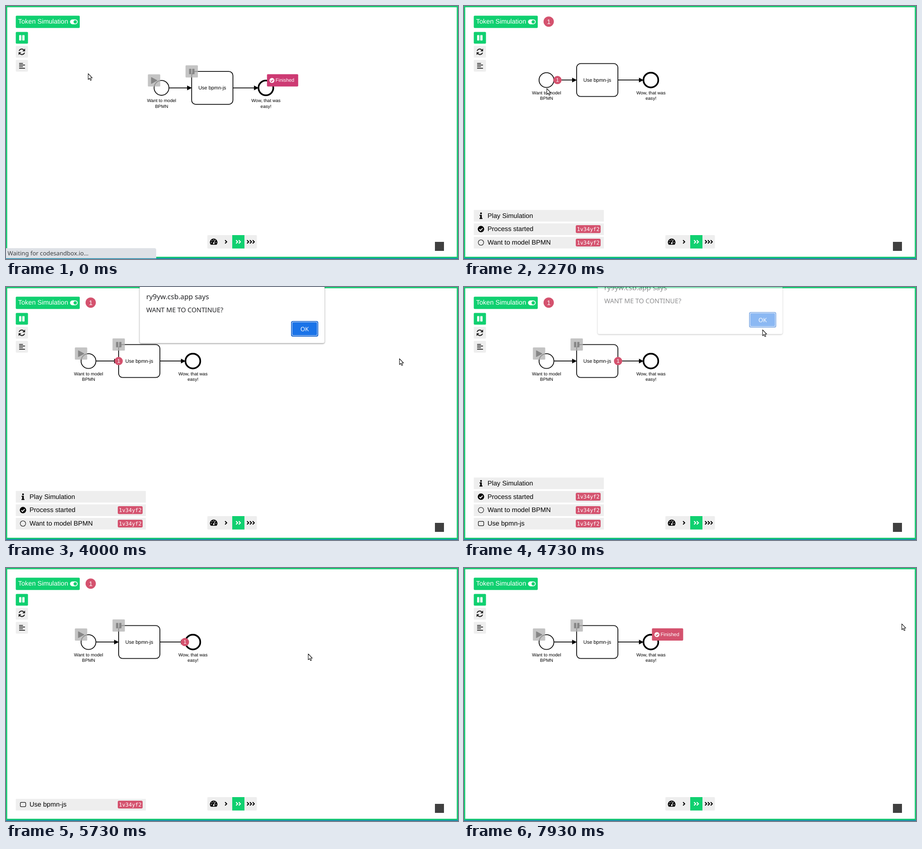
Recreate the animation shown at these times as an HTML page. Size 999x561 px, loop 9990 ms.

```html
<!DOCTYPE html>
<html lang="en">
<head>
<meta charset="utf-8">
<title>Token simulation</title>
<style>
  html, body { margin: 0; width: 100%; height: 100%; overflow: hidden; background: #fff; }
  svg { display: block; width: 999px; height: 561px; }
  text { font-family: "Liberation Sans", Arial, sans-serif; white-space: pre; text-rendering: geometricPrecision; }
  .ui { font-family: "Noto Sans", sans-serif; }
  .mono { font-family: "DejaVu Sans Mono", monospace; }
  .mid { text-anchor: middle; }
</style>
</head>
<body>
<svg id="stage" viewBox="0 0 999 561" xmlns="http://www.w3.org/2000/svg"></svg>
<script>
const LOOP = 9990, STEP = 1000 / 15;
const GREEN = '#10d070', GREY = '#eeeeee', INK = '#111', RED = '#d4526e';
const stage = document.getElementById('stage');

const rect = (x, y, w, h, fill, r = 0, more = '') =>
  `<rect x="${x}" y="${y}" width="${w}" height="${h}" rx="${r}" fill="${fill}" ${more}/>`;
const disc = (x, y, r, fill, more = '') =>
  `<circle cx="${x}" cy="${y}" r="${r}" fill="${fill}" ${more}/>`;
const path = (d, more) => `<path d="${d}" ${more}/>`;
const line = (d, color, w, more = '') =>
  path(d, `fill="none" stroke="${color}" stroke-width="${w}" ${more}`);
const text = (x, y, size, str, fill = '#000', cls = '') =>
  `<text x="${x}" y="${y}" font-size="${size}" fill="${fill}" class="${cls}">${str}</text>`;
const group = (id, body, more = '') => `<g id="${id}" ${more}>${body}</g>`;

const check = (x, y, r, fill, mark) => disc(x, y, r, fill) +
  line(`M${x - r * .5} ${y + r * .05}l${r * .36} ${r * .38}l${r * .66} ${-r * .72}`, mark, r * .3);
const pause = (x, y, fill) => rect(x - 6, y - 6, 5, 12, fill, 1) + rect(x + 1, y - 6, 5, 12, fill, 1);
const chevron = (x, color) => line(`M${x - 1.8} 519.2l3.6 3.7l-3.6 3.7`, color, 2.1);
const token = (id, r, size) =>
  group(id, disc(0, 0, r, RED) + text(0, size * .36, size, '1', '#fff', 'mid'));

function sync() {
  const half = line('M29 99.5A6.2 6.2 0 0 1 39.6 97.6', '#222', 2.1) +
    path('M42.2 94.3V100.4H36.1Z', 'fill="#222"');
  return half + `<g transform="rotate(180 35 101.5)">${half}</g>`;
}

function gauge() {
  const dots = [[-5.2, 1.6], [-3.8, -2.6], [0, -4.4], [5.2, 1.6]]
    .map(([x, y]) => disc(459 + x, 523 + y, 1, GREY)).join('');
  return path('M452.6 529A8.1 8.1 0 1 1 465.4 529Z',
    'fill="#000" stroke="#000" stroke-width=".6" stroke-linejoin="round"') + dots +
    line('M459.4 526L462.6 518.6', GREY, 1.3) + disc(459.2, 526, 1.9, GREY);
}

function panel() {
  return rect(21.6, 21.5, 141.4, 27.2, GREEN, 2) + text(26.8, 39.3, 14.5, 'Token Simulation', '#fff') +
    rect(141.5, 29.8, 17, 10.6, '#fff', 5.3) + disc(153, 35.1, 3.7, GREEN) +
    rect(21.6, 57.5, 27, 26, GREEN, 2) + pause(35, 70.5, '#fff') +
    rect(21.6, 88.5, 27, 26, GREY, 2) + sync() +
    rect(21.6, 119.5, 27, 26, GREY, 2) +
    line('M29 127.3h8.5M29 130.9h13M29 134.5h8.5M29 138.1h13', '#222', 1.7) +
    rect(445, 508, 109.5, 29.7, GREY, 2) + rect(500, 508, 27, 29.7, GREEN) + gauge() +
    chevron(486, '#000') + [510.3, 516.3].map(x => chevron(x, '#fff')).join('') +
    [534.6, 540.8, 547].map(x => chevron(x, '#000')).join('') +
    rect(948, 523, 20, 20, '#404040');
}

function diagram() {
  const label = (x, a, b) => text(x, 196, 10.04, a, '#000', 'mid') + text(x, 208.4, 10.04, b, '#000', 'mid');
  const flow = (a, b) => line(`M${a} 164.2H${b - 6}`, '#000', 1.83) +
    path(`M${b} 164.2l-9.6 -4.8v9.6Z`, 'fill="#000" stroke="#000" stroke-width=".6"');
  const pad = (x, y) => rect(x, y, 27.3, 27, 'rgba(180,180,180,.78)', 1.5);
  return disc(182.3, 164.2, 16.4, '#fff', `stroke="${INK}" stroke-width="1.83"`) +
    rect(248.9, 127.7, 91.25, 73, '#fff', 9.1, `stroke="${INK}" stroke-width="1.83"`) +
    disc(413, 164.2, 16.4, '#fff', 'stroke="#000" stroke-width="3.65"') +
    flow(199, 248.8) + flow(340.5, 396.5) +
    text(294.5, 167.8, 10.95, 'Use bpmn-js', '#000', 'mid') +
    label(182.5, 'Want to model', 'BPMN') + label(413.2, 'Wow, that was', 'easy!') +
    group('play', pad(152.2, 134) + path('M160 141.3L172.2 147.8L160 154.4Z',
      'fill="#868686" stroke="#868686" stroke-width="1.4" stroke-linejoin="round"')) +
    group('hold', pad(235.4, 114) + pause(249.2, 127.8, '#868686')) +
    group('done', rect(415.4, 133.8, 69, 27.2, 'currentColor', 2) +
      check(426.4, 147.7, 5.5, '#fff', 'currentColor') +
      text(434.4, 151.1, 10.95, 'Finished', '#fff'));
}

function dialog() {
  return path('M295.5 -140H704V120.5a4 4 0 0 1 -4 4H299.5a4 4 0 0 1 -4 -4Z',
      'fill="#fff" style="filter:drop-shadow(0 1px 1.6px rgba(0,0,0,.5))"') +
    text(310, 27.2, 15.5, 'ry9yw.csb.app says', '#202124', 'ui') +
    text(310, 56.3, 14.25, 'WANT ME TO CONTINUE?', '#202124', 'ui') +
    rect(630, 75.5, 60.2, 34.4, '#1a67cf', 4) + rect(631.8, 77.3, 56.6, 30.8, '#d3e3fc', 3) +
    rect(632.8, 78.3, 54.6, 28.8, '#1a73e8', 2.5) + text(660, 97.5, 13.2, 'OK', '#fff', 'ui mid');
}

// Log lines: label and icon drawn around height y
const ring = w => y => disc(37.5, y, 6, 'none', `stroke="#111" stroke-width="${w}"`);
const tick = y => check(37.5, y, 7.1, '#000', GREY);
const LOG = {
  play: ['Play Simulation', y => disc(37.6, y - 5.2, 2, '#000') +
    path(`M34.5 ${y - 2}h4.8v7h1.4v2.3h-6.4v-2.3h1.5v-4.7h-1.3Z`, 'fill="#000"')],
  begin: ['Process started', tick],
  want: ['Want to model BPMN', ring(1.1)],
  use: ['Use bpmn-js', y => rect(31.6, y - 4.8, 12, 9.6, 'none', 2.4, 'stroke="#111" stroke-width="1.2"')],
  wow: ['Wow, that was easy!', ring(2.2)],
  end: ['Process finished', tick]
};

const logAt = t =>
  t < 2090 ? [] :
  t < 4660 ? ['play', 'begin', 'want'] :
  t < 4860 ? ['play', 'begin', 'want', 'use'] :
  t < 5790 ? ['use'] :
  t < 6725 ? ['use', 'wow', 'end'] :
  t < 7790 ? ['wow', 'end'] : [];

function logRows(keys) {
  return keys.map((key, i) => {
    const y = 524.5 - 29.8 * (keys.length - 1 - i), [label, icon] = LOG[key];
    const tag = key === 'play' ? '' : rect(247, y - 8.6, 55, 17.4, RED, 3) +
      text(249.6, y + 4.4, 11.86, '1v34yf2', '#fff', 'mono');
    return rect(21.6, y - 12.6, 287.4, 25.8, GREY) + icon(y) + text(52, y + 4.6, 14.6, label) + tag;
  }).join('');
}

stage.innerHTML = rect(0, 0, 999, 561, '#fff') +
  group('model', diagram()) + panel() + token('count', 11.4, 14.6) + token('token', 9.1, 11.9) +
  group('log', '') +
  path('M0 0H999V559H0ZM2.7 2.7V556H996.3V2.7Z', 'fill="#17cb72" fill-rule="evenodd"') +
  rect(0, 558.8, 999, 2.2, '#1b88ac') +
  group('status', path('M0 537H328a4 4 0 0 1 4 4V559.5H0Z', 'fill="#dee1e6"') +
    text(3.6, 553.2, 13.1, 'Waiting for codesandbox.io…', '#3c4043', 'ui')) +
  group('dialog', dialog()) +
  group('cursor', path('M0 0V13L3 10.3L5 15L7.2 14.1L5.2 9.5H9Z',
    'fill="#fff" stroke="#111" stroke-width="1.1" stroke-linejoin="round"'));

const el = {};
for (const node of stage.querySelectorAll('[id]')) el[node.id] = node;

const show = (node, on) => node.setAttribute('display', on ? 'inline' : 'none');
const move = (node, x, y) => node.setAttribute('transform', `translate(${x} ${y})`);
const part = (t, a, b) => Math.min(1, Math.max(0, (t - a) / (b - a)));
const sine = u => (1 - Math.cos(Math.PI * u)) / 2;

// Pointer stops: time, x, y
const STOPS = [
  [1733, 181.6, 150], [2067, 183, 183], [3733, 183, 183], [4000, 869.6, 159],
  [4067, 869.6, 159], [4533, 660, 95], [4800, 660, 95], [5000, 668, 190.5],
  [7000, 668, 190.5], [7200, 715.6, 195.5], [7400, 715.6, 195.5], [7933, 967.6, 123.8]
];

function pointer(t) {
  let [, x, y] = STOPS[0];
  for (let i = 1; i < STOPS.length && t > STOPS[i - 1][0]; i++) {
    const [a, x0, y0] = STOPS[i - 1], [b, x1, y1] = STOPS[i], u = sine(part(t, a, b));
    x = x0 + (x1 - x0) * u;
    y = y0 + (y1 - y0) * u;
  }
  return [x, y];
}

let rows = '';
function draw(t) {
  const first = t < 1790, running = t > 2090 && t < 5790, ended = t > 5790;
  move(el.model, first ? 161.4 : 0, first ? 17.4 : 0);
  show(el.play, t < 2090 || t > 2725);
  show(el.hold, first || t > 2725);
  show(el.done, first || ended);
  el.done.setAttribute('color', first ? '#cd3a73' : RED);
  show(el.status, t < 990);

  show(el.count, running);
  move(el.count, 187.2, 34.6);
  show(el.token, running);
  move(el.token, t < 4725
    ? 199 + 50 * sine(part(t, 2107, 2733))
    : 340.5 + 55 * sine(part(t, 4740, 5733)), 164.2);

  const open = part(t, 2733, 3333), shut = part(t, 4600, 4867);
  show(el.dialog, open > 0 && shut < 1);
  move(el.dialog, 0, -128 * Math.pow(1 - open, 2.35) - 40 * shut);
  el.dialog.setAttribute('opacity', 1 - shut);

  const keys = logAt(t), id = keys.join();
  if (id !== rows) {
    rows = id;
    el.log.innerHTML = logRows(keys);
  }
  move(el.cursor, ...pointer(t));
}

// The picture advances fifteen times a second
function play() {
  const t = performance.now() % LOOP;
  draw(Math.floor((t + 5) / STEP) * STEP);
  requestAnimationFrame(play);
}
play();
</script>
</body>
</html>
```
